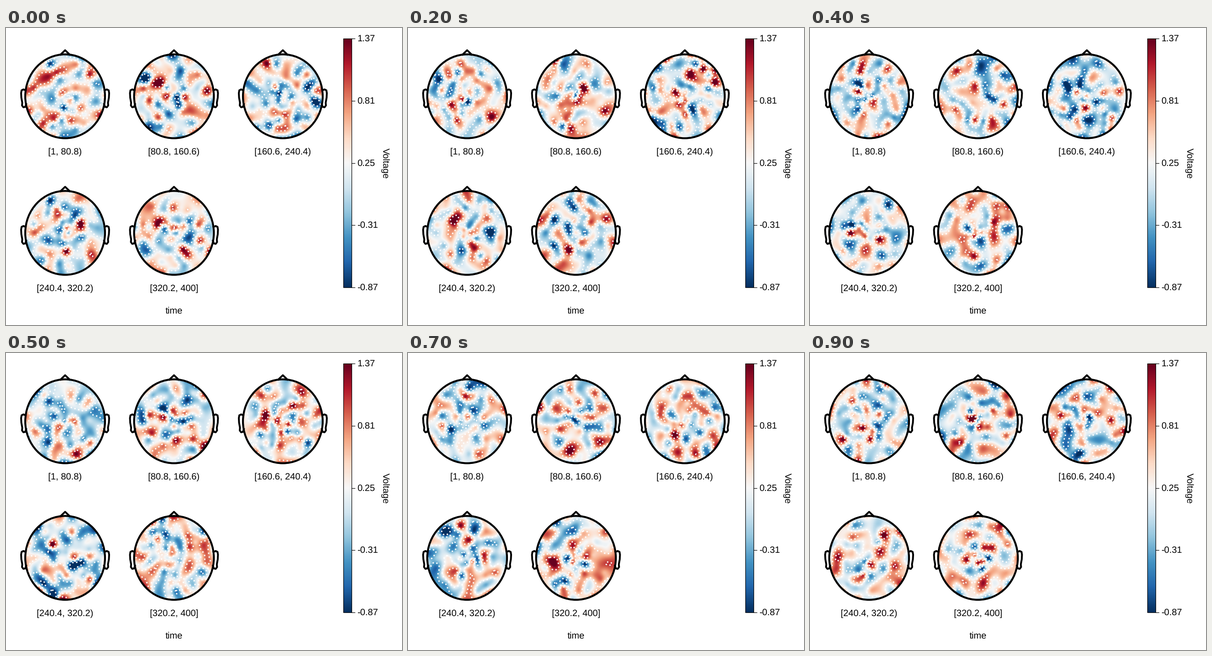
Write a matplotlib script that moves like this. It is 864x648 px and loops after 1 s.

```python
import numpy as np
import matplotlib.pyplot as plt
from matplotlib.animation import FuncAnimation
from matplotlib.patches import Ellipse, Rectangle

plt.rcParams["font.family"] = "Liberation Sans"
plt.rcParams["text.hinting"] = "no_hinting"
WIDTH, HEIGHT, DPI = 864, 648, 72
STEPS, STEP_MS = 10, 100
VMIN, VMAX = -0.87, 1.37
RX, RY = 87, 91.5
COLUMNS, ROWS = (129, 366.5, 604), (149, 447)
BIN_LABELS = ("[1, 80.8)", "[80.8, 160.6)", "[160.6, 240.4)",
              "[240.4, 320.2)", "[320.2, 400]")


def electrode_layout():
    """Concentric rings, denser towards the centre, slightly jittered."""
    rng = np.random.default_rng(4)
    rings = [np.zeros((1, 2))]
    for ring in range(1, 7):
        radius = (ring / 6) ** 1.15
        count = 3 + 4 * ring
        angles = 2 * np.pi * (np.arange(count) + 0.5 * (ring % 2)) / count
        rings.append(radius * np.column_stack((np.cos(angles), np.sin(angles))))
    points = np.vstack(rings)
    return points + rng.normal(0, 0.025, points.shape)


def thin_plate(a, b):
    sq = ((a[:, None] - b[None]) ** 2).sum(-1)
    return sq * np.log(sq + 1e-12)


def spline_weights(points, targets):
    """Matrix taking electrode values to a thin-plate spline at the targets."""
    n = len(points)
    poly = np.column_stack((np.ones(n), points))
    system = np.block([[thin_plate(points, points), poly],
                       [poly.T, np.zeros((3, 3))]])
    basis = np.column_stack((thin_plate(targets, points),
                             np.ones(len(targets)), targets))
    return basis @ np.linalg.inv(system)[:, :n]


AXIS = np.linspace(-1, 1, 100)
GRID_X, GRID_Y = np.meshgrid(AXIS, AXIS)
INSIDE = GRID_X ** 2 + GRID_Y ** 2 <= 1
ELECTRODES = electrode_layout()
WEIGHTS = spline_weights(ELECTRODES, np.column_stack((GRID_X.ravel(), GRID_Y.ravel())))


def voltage_field(step, head):
    rng = np.random.default_rng((step, head))
    values = rng.normal(rng.normal(0.25, 0.08), 0.5, len(ELECTRODES))
    return (WEIGHTS @ values).reshape(GRID_X.shape)


fig = plt.figure(figsize=(WIDTH / DPI, HEIGHT / DPI), dpi=DPI, facecolor="white")
ax = fig.add_axes((0, 0, 1, 1))
ax.axis("off")


def label(x, baseline, text, **kwargs):
    ax.text(x, baseline, text, fontsize=20, va="baseline", **kwargs)


def outline(xs, ys):
    ax.plot(xs, ys, color="black", lw=4, solid_joinstyle="round", zorder=4)


def draw_head(x, y, text):
    clip = Ellipse((x, y), 2 * RX, 2 * RY, fc="none", ec="none")
    ax.add_patch(clip)
    image = ax.imshow(np.zeros_like(GRID_X), cmap="RdBu_r", vmin=VMIN, vmax=VMAX,
                      extent=(x - RX, x + RX, y + RY, y - RY),
                      interpolation="bilinear", zorder=1)
    image.set_clip_path(clip)
    ax.add_patch(Ellipse((x, y), 2 * RX, 2 * RY, fc="none", ec="black",
                         lw=4.2, zorder=5))
    outline([x - 10, x, x + 10], [y - 91, y - 100.5, y - 91])
    ear_x = np.array([86, 91, 95, 96, 95.5, 93.5, 94, 91, 87, 85])
    ear_y = y + np.array([-13, -15, -13, -7, 3, 14, 20, 24, 23, 17])
    outline(x - ear_x, ear_y)
    outline(x + ear_x, ear_y)
    label(x, y + 127, text, ha="center")
    return x, y, image, clip


def draw_colorbar():
    left, right, top, bottom = 735.5, 753.5, 23, 566
    ax.imshow(np.linspace(VMAX, VMIN, 256)[:, None], cmap="RdBu_r",
              extent=(left, right, bottom, top), interpolation="bilinear")
    ax.add_patch(Rectangle((left, top), right - left, bottom - top,
                           fc="none", ec="black", lw=1.2, zorder=3))
    ticks = np.linspace(VMAX, VMIN, 5)
    for tick, y in zip(ticks, np.linspace(top, bottom, 5)):
        ax.plot([right, right + 7], [y, y], color="black", lw=1.2)
        label(766.5, y + 7, f"{tick:.2f}")
    label(822, 295, "Voltage", ha="center", rotation=-90, rotation_mode="anchor")


heads = [draw_head(COLUMNS[i % 3], ROWS[i // 3], text)
         for i, text in enumerate(BIN_LABELS)]
draw_colorbar()
label(366.5, 623, "time", ha="center")
ax.set(aspect="auto")
contours = []


def update(step):
    while contours:
        contours.pop().remove()
    for i, (x, y, image, clip) in enumerate(heads):
        field = voltage_field(step, i)
        image.set_data(field)
        levels = np.linspace(field[INSIDE].min(), field[INSIDE].max(), 6)[1:-1]
        lines = ax.contour(x + RX * AXIS, y + RY * AXIS, field, levels=levels,
                           colors="white", linewidths=3,
                           linestyles=[(0, (1, 1.8))], zorder=2)
        lines.set_clip_path(clip)
        contours.append(lines)
    ax.set(xlim=(0, WIDTH), ylim=(HEIGHT, 0))
    return []


animation = FuncAnimation(fig, update, frames=STEPS, interval=STEP_MS,
                          init_func=lambda: [], repeat=True, repeat_delay=0)
plt.show()
```
